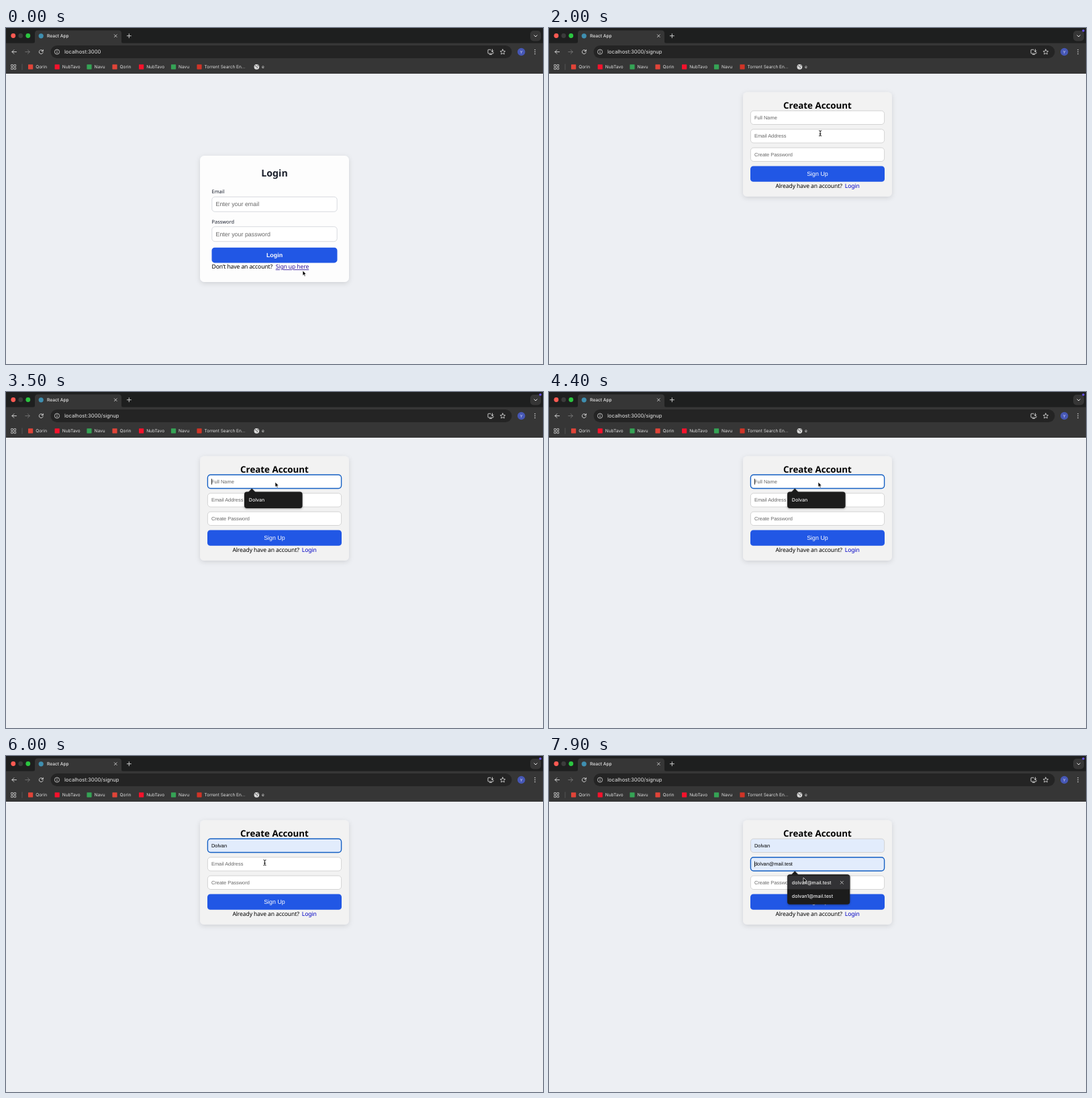
Recreate the animation shown at these times as an HTML page. Size 800 by 500 pixels, loop 8000 ms.

```html
<!DOCTYPE html>
<html lang="en">
<head>
<meta charset="utf-8">
<title>Sign up flow</title>
<style>
  html, body { margin: 0; width: 100%; height: 100%; overflow: hidden; background: #edeff3; }
  svg { display: block; width: 100vw; height: 100vh; }
  text { text-rendering: geometricPrecision; white-space: pre; }
  .ui { font-family: Inter, Roboto, sans-serif; }
  .page { font-family: "Noto Sans", "Open Sans", sans-serif; }
  .field { font-family: "Liberation Sans", sans-serif; }
  .body { font-size: 8.6px; letter-spacing: -.12px; }
  .line { fill: none; stroke-linecap: round; stroke-linejoin: round; }
</style>
</head>
<body>
<svg id="stage" viewBox="0 0 800 500">
  <defs>
    <filter id="soft" x="-20%" y="-20%" width="140%" height="150%">
      <feDropShadow dx="0" dy="2" stdDeviation="3.5" flood-color="#000" flood-opacity=".13"/>
    </filter>
    <filter id="lift" x="-20%" y="-30%" width="140%" height="170%">
      <feDropShadow dx="0" dy="1" stdDeviation="1.5" flood-color="#000" flood-opacity=".35"/>
    </filter>
  </defs>
</svg>
<script>
const LOOP = 8000;
const NAME = "Dolvan";
const MAILS = ["dolvan@mail.test", "dolvan1@mail.test"];
const BLUE = "#2157e5";
const stage = document.getElementById("stage");

function add(parent, tag, attrs, content) {
  const el = document.createElementNS("http://www.w3.org/2000/svg", tag);
  for (const key in attrs) el.setAttribute(key, attrs[key]);
  if (content !== undefined) el.textContent = content;
  parent.appendChild(el);
  return el;
}
const group = (parent, attrs = {}) => add(parent, "g", attrs);
const rect = (parent, x, y, width, height, fill, rx = 0, more = {}) =>
  add(parent, "rect", { x, y, width, height, fill, rx, ...more });
const circle = (parent, cx, cy, r, fill, more = {}) =>
  add(parent, "circle", { cx, cy, r, fill, ...more });
const line = (parent, d, stroke, width = 0.9) =>
  add(parent, "path", { d, stroke, "stroke-width": width, class: "line" });
const text = (parent, x, y, str, cls, size, fill, more = {}) =>
  add(parent, "text", { x, y, class: cls, fill, ...(size && { "font-size": size }), ...more }, str);
const middle = { "text-anchor": "middle" };
const bold = { "font-weight": 700 };
const show = (el, on) => el.setAttribute("visibility", on ? "inherit" : "hidden");
const cross = (parent, x, y, r, color) =>
  line(parent, `M${x - r} ${y - r}l${2 * r} ${2 * r}m0 ${-2 * r}l${-2 * r} ${2 * r}`, color, 0.8);

// Browser frame
function buildBrowser() {
  const g = group(stage);
  rect(g, 0, 0, 800, 23, "#1e1f1f");
  rect(g, 0, 22.5, 800, 45.5, "#363636");
  ["#ff5a52", "#3c3c3c", "#2bc540"].forEach((c, i) => circle(g, 10.8 + i * 11, 11.5, 3.4, c));
  add(g, "path", { d: "M40 23q3 0 3-3V8q0-4.5 4.500-4.500H167.500q4.500 0 4.500 4.500v12q0 3 3 3z", fill: "#363636" });
  circle(g, 52.2, 11.8, 3.6, "#3f8fb0");
  text(g, 61, 14.1, "React App", "ui", 6.65, "#e6e6e6", { "font-weight": 500 });
  cross(g, 163.3, 11.7, 1.9, "#dedede");
  line(g, "M180.300 11.700h6m-3-3v6", "#dcdcdc");
  rect(g, 781, 4, 16, 15.5, "#363636", 5);
  line(g, "M786.800 10.800l2.200 2.200l2.200-2.200", "#e2e2e2", 1);

  line(g, "M15.500 35.500h-6.500m2.900-2.900l-2.900 2.900l2.900 2.900", "#dddddd");
  line(g, "M28.800 35.500h6.500m-2.900-2.900l2.900 2.900l-2.900 2.900", "#777777");
  line(g, "M55 34.200a3 3 0 1 0 .2 2.200M55.300 32.300v2.200h-2.200", "#dddddd");
  rect(g, 66.500, 26, 687, 19, "#242424", 9.5);
  circle(g, 76, 35.5, 3.6, "none", { stroke: "#dddddd", "stroke-width": 0.8 });
  line(g, "M76 35.300v1.800M76 33.600v.1", "#dddddd");
  line(g, "M722 32.200h-3.200q-.8 0-.8.8v4.200q0 .8.8.8h6.400q.8 0 .8-.8v-1M720.500 39.500h3M724.500 31.800v3.600m-1.600-1.500l1.600 1.600l1.600-1.600", "#dddddd");
  const star = Array.from({ length: 10 }, (_, i) => {
    const a = i * Math.PI / 5 - Math.PI / 2, r = i % 2 ? 1.9 : 4;
    return (740 + r * Math.cos(a)).toFixed(2) + " " + (35.8 + r * Math.sin(a)).toFixed(2);
  });
  line(g, "M" + star.join("L") + "Z", "#dddddd", 0.8);
  circle(g, 767.7, 35.5, 5.7, "#4657b5");
  text(g, 767.7, 37.6, "Y", "ui", 5.8, "#dfe3ff", middle);
  [-3, 0, 3].forEach(d => circle(g, 788, 35.5 + d, 0.8, "#dddddd"));

  for (const x of [7.6, 11.9]) for (const y of [54.500, 58.800])
    rect(g, x, y, 2.8, 2.8, "none", 0.3, { stroke: "#cfcfcf", "stroke-width": 0.8 });
  rect(g, 23.600, 53.5, 0.8, 9, "#5c5c5c");
  const mark = (x, color, label) => {
    rect(g, x - 3.6, 54.2, 7.2, 7.2, color, 0.6);
    text(g, x + 7.6, 60.1, label, "ui", 6.5, "#dedede");
  };
  mark(36.6, "#e04438", "Qorin");
  mark(76.2, "#f5122c", "NubTavo");
  mark(124, "#35a355", "Navu");
  mark(162, "#e04438", "Qorin");
  mark(201.600, "#f5122c", "NubTavo");
  mark(249.500, "#35a355", "Navu");
  mark(288, "#d03427", "Torrent Search En…");
  circle(g, 373.4, 57.8, 3.9, "#d9d9d9");
  line(g, "M371.200 56.200q1.500 0 2 1.300q1.600.2 1.200 1.800M374.800 55.200l1 1.300", "#4a4a4a", 1);
  text(g, 381, 60.1, "e", "ui", 6.5, "#dedede");
  return text(g, 87, 38.3, "", "ui", 7.7, "#e6e6e6");
}

function buildLogin() {
  const g = group(stage);
  rect(g, 289, 190, 222, 188, "#fdfdfd", 6.5, { filter: "url(#soft)" });
  text(g, 400, 221.3, "Login", "page", 14.2, "#1a1f2b", { ...middle, ...bold });
  [["Email", 246.2, "Enter your email", 251.300], ["Password", 290.6, "Enter your password", 295.700]]
    .forEach(([label, base, hint, top]) => {
      text(g, 306.600, base, label, "page", 7.4, "#1b2130");
      rect(g, 306.800, top, 186.400, 22, "#fff", 4.4, { stroke: "#cfd2d8", "stroke-width": 0.8 });
      text(g, 312.500, top + 14.1, hint, "field", 8.89, "#666666");
    });
  rect(g, 306.500, 326.700, 187, 22.700, BLUE, 4.4);
  text(g, 400, 341.100, "Login", "field", 8.89, "#fff", { ...middle, ...bold });
  text(g, 306.600, 358.300, "Don’t have an account?", "page body", 0, "#000");
  text(g, 401.700, 358.300, "Sign up here", "page body", 0, "#2e1299", { "text-decoration": "underline" });
  return g;
}

function buildField(parent, y, hint) {
  const box = rect(parent, 300.400, y, 199.200, 20.300, "#fff", 4.4);
  const label = text(parent, 306, y + 12.6, hint, "field", 7.41, "#666666");
  return (focus, value) => {
    box.setAttribute("fill", value ? "#e2ecfc" : "#fff");
    box.setAttribute("stroke", focus ? "#1560c4" : "#cccccc");
    box.setAttribute("stroke-width", focus ? 1.4 : 0.8);
    label.textContent = value || hint;
    label.setAttribute("fill", value ? "#000" : "#666666");
  };
}

function buildSignup() {
  const g = group(stage);
  rect(g, 289, 95.500, 222, 155.300, "#f2f2f2", 6, { filter: "url(#soft)" });
  text(g, 400, 120, "Create Account", "page", 13.33, "#000", { ...middle, ...bold });
  const fields = [[123.200, "Full Name"], [150.700, "Email Address"], [178.200, "Create Password"]]
    .map(([y, hint]) => buildField(g, y, hint));
  rect(g, 300, 205.500, 200, 23.300, BLUE, 4.4);
  text(g, 400, 220.200, "Sign Up", "field", 8.89, "#fff", middle);
  text(g, 337.400, 238, "Already have an account?", "page body", 0, "#000");
  text(g, 440.800, 238, "Login", "page body", 0, "#0000c4");
  return { g, fields, caret: rect(g, 0, 0, 0.8, 8.600, "#000") };
}

function buildPopup(top, width, rows) {
  const g = group(stage, { filter: "url(#lift)" });
  const height = rows.length * 20 + 4.5;
  add(g, "path", { d: `M361 ${top + 0.5}L366.300 ${top - 5}L371.600 ${top + 0.5}Z`, fill: "#1b1b1c" });
  rect(g, 355, top, width, height, "#1b1b1c", 4);
  const hover = group(g);
  rect(hover, 355, top + 2, width, 20, "#323234");
  cross(hover, 343 + width, top + 12.1, 2.1, "#d0d0d0");
  rows.forEach((row, i) =>
    text(g, 361.800, top + 14.6 + i * 20, row, "ui", 7.1, "#f0f0f0", { "font-weight": 500 }));
  return (on, hot) => { show(g, on); show(hover, on && hot); };
}

const address = buildBrowser();
const login = buildLogin();
const signup = buildSignup();
const namePopup = buildPopup(148.600, 86.600, [NAME]);
const mailPopup = buildPopup(176.200, 93.300, MAILS);

const status = group(stage);
add(status, "path", { d: "M0 488.500H74q3 0 3 3V500H0Z", fill: "#222222" });
text(status, 2.600, 496.500, "localhost:3000/signup", "ui", 6.57, "#e2e2e2");
const dot = circle(stage, 796, 4, 1.8, "#6a55f2");

const pointer = group(stage);
const outlined = { fill: "#000", stroke: "#fff", "stroke-width": 0.7, "stroke-linejoin": "round" };
const arrow = add(pointer, "path", { d: "M0 0V7.400L1.700 5.900L2.900 8.700L4.200 8.100L3 5.400H5.300Z", ...outlined });
const hand = add(pointer, "path", {
  d: "M-.6 0q.7-.7 1.200 0v3l3 .7q1 .4.8 1.500l-.6 3.300h-4l-2.500-3.200q.2-1 1.300-.3l.8.600Z", ...outlined
});
const beam = group(pointer);
line(beam, "M-1.600-4q1.600 0 1.600 1v6q0 1-1.600 1M1.600-4q-1.600 0-1.600 1M0 3q0 1 1.600 1M-.9.900h1.800", "#000", 0.9);

// Timeline (ms)
const PATH = [
  [500, 442, 361], [800, 431, 355], [1400, 431, 355], [2150, 401, 134],
  [5000, 401, 134], [5250, 388, 157], [5600, 388, 157], [6500, 382, 161],
  [7200, 382, 161], [7500, 380, 171], [7780, 380, 171], [7800, 379, 181]
];
const NAV = 1000, NAME_FOCUS = 2200, NAME_POPUP = 2300, NAME_HOVER = 5100,
      NAME_SET = 5300, MAIL_FOCUS = 6700, MAIL_HOVER = 7800;
const CARET_STARTS = [NAME_FOCUS, NAME_SET, MAIL_FOCUS, MAIL_HOVER];

function pointerAt(t) {
  const i = PATH.findIndex(p => p[0] > t);
  if (i === 0) return PATH[0].slice(1);
  if (i < 0) return PATH[PATH.length - 1].slice(1);
  const [t0, x0, y0] = PATH[i - 1], [t1, x1, y1] = PATH[i];
  const k = (t - t0) / (t1 - t0), e = k * k * (3 - 2 * k);
  return [x0 + (x1 - x0) * e, y0 + (y1 - y0) * e];
}

function draw(t) {
  const within = (a, b) => t >= a && t < b;
  const onSignup = t >= NAV;
  show(login, !onSignup);
  show(signup.g, onSignup);
  address.textContent = "localhost:3000" + (onSignup ? "/signup" : "");
  show(dot, t >= 500);
  status.setAttribute("opacity", within(600, 1700) ? Math.min(1, (1700 - t) / 200) : 0);

  const [name, mail, pass] = signup.fields;
  name(within(NAME_FOCUS, MAIL_FOCUS), t >= NAME_HOVER && NAME);
  mail(t >= MAIL_FOCUS, t >= MAIL_HOVER && MAILS[0]);
  pass(false, "");
  namePopup(within(NAME_POPUP, NAME_SET), t >= NAME_HOVER);
  mailPopup(t >= MAIL_FOCUS, t >= MAIL_HOVER);

  const start = CARET_STARTS.filter(s => s <= t).pop();
  show(signup.caret, start !== undefined && Math.floor((t - start) / 500) % 2 === 0);
  signup.caret.setAttribute("x", within(NAME_SET, MAIL_FOCUS) ? 329.200 : 306);
  signup.caret.setAttribute("y", t >= MAIL_FOCUS ? 156.600 : 129.100);

  const [x, y] = pointerAt(t);
  pointer.setAttribute("transform", `translate(${x.toFixed(2)} ${y.toFixed(2)})`);
  const onLink = within(0, NAV) && y < 359.5;
  const onField = within(NAME_SET, MAIL_FOCUS) ||
    (within(NAV, NAME_POPUP) && [123, 150.5, 178].some(top => y > top && y < top + 20.5));
  show(hand, onLink);
  show(beam, onField);
  show(arrow, !onLink && !onField);
}

const began = performance.now();
function tick() {
  draw((performance.now() - began) % LOOP);
  requestAnimationFrame(tick);
}
tick();
</script>
</body>
</html>
```
